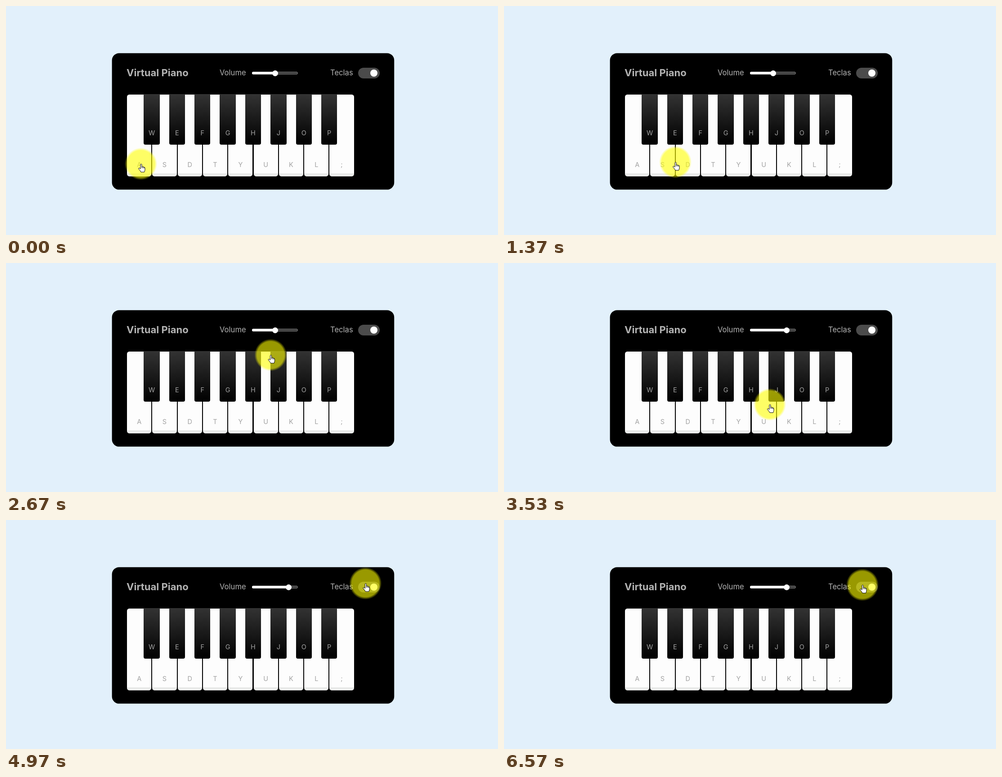
Animation of 1094x512 px, one loop 7.31 s. Source, as an HTML page:

```html
<!DOCTYPE html>
<html lang="en">
<head>
<meta charset="utf-8">
<title>Virtual Piano</title>
<style>
html, body { margin: 0; width: 100%; height: 100%; overflow: hidden; background: #e2f0fb; }
body { position: relative; font: 16.6px Inter, sans-serif; color: #b4b4b4; }
body * { position: absolute; box-sizing: border-box; }
.card { left: 0; top: 0; }
.head { top: 134px; line-height: 31px; white-space: nowrap; }
.title { left: 268px; font-size: 22px; font-weight: 700; }
.track { left: 547px; top: 147px; width: 102px; height: 6px; border-radius: 3px; background: #3b3b3b; border: 1px solid #858585; }
.fill { left: 547px; top: 147px; height: 6px; border-radius: 3px; background: #fff; }
.thumb { top: 143.5px; width: 13px; height: 13px; margin-left: -6.5px; border-radius: 50%; background: #fff; }
.toggle { left: 783px; top: 137.5px; width: 48px; height: 24px; border-radius: 12px; background: #4b4b4b; }
.knob { top: 4px; width: 16px; height: 16px; border-radius: 50%; }
.key { text-align: center; font-size: 14.5px; color: #a2a2a2; }
.key span { left: 0; width: 100%; line-height: 20px; }
.white { top: 197px; width: 56.3px; height: 185px; border: 1px solid #000; border-radius: 6.4px; background: linear-gradient(#fdfdfd 96%, #eaebea 96%); }
.white span { bottom: 16px; }
.black { top: 197px; width: 35.4px; height: 113px; border-radius: 0 0 4px 4px; background: linear-gradient(#333, #000); }
.black span { bottom: 16.5px; }
.white.active { background: linear-gradient(#fff, #f6f6f6); box-shadow: inset -4px 4px 16px rgba(0, 0, 0, .27); }
.black.active { background: linear-gradient(#000, #434343); box-shadow: inset -4px -8px 8px rgba(255, 255, 255, .1); }
.hidden span { display: none; }
#pointer { left: 0; top: 0; }
.glow { left: -36px; top: -36px; width: 72px; height: 72px; background: radial-gradient(closest-side, rgba(255, 255, 0, .6) 84%, rgba(255, 255, 0, 0)); }
#pointer svg { left: 0; top: 0; overflow: visible; fill: #fff; stroke: #000; stroke-linejoin: round; }
</style>
</head>
<body>
<svg class="card" width="1094" height="512"><rect x="235.6" y="105.4" width="627.6" height="305.2" rx="16"/></svg>
<div class="head title">Virtual Piano</div>
<div class="head" style="left:475px">Volume</div>
<div class="track"></div><div class="fill" id="fill"></div><div class="thumb" id="thumb"></div>
<div class="head" style="left:721px">Teclas</div>
<div class="toggle"><div class="knob" id="knob"></div></div>
<div id="keys"></div>
<div id="pointer">
  <div class="glow"></div>
  <svg width="1" height="1">
    <path id="hand" d="M-1 1.7Q-1 .3 .5 .3T2 1.7V6Q4 5.2 4.7 6.7Q6.5 6 7.2 7.5Q9 7.2 9 9.5V13Q9 15 7.5 18.3H0Q-1 15.5-5 11.3Q-5.8 9.6-4.2 9.1Q-3 9-1 11.2ZM2 6v3.5M4.7 6.7v3M7.2 7.5v2.5"/>
    <path id="arrow" d="M.5 .5V16l3.6-3.4 2.4 5.4 2.2-1-2.4-5.3H11Z"/>
  </svg>
</div>
<script>
const LOOP = 7310;
const $ = id => document.getElementById(id);

// time, x, y of the pointer tip
const path = [
  [0, 300, 353], [420, 300, 353], [560, 342, 357], [700, 378, 351], [870, 378, 351],
  [1080, 390, 355], [1370, 381, 349], [1570, 381, 349], [1800, 395, 339], [2070, 414, 321],
  [2220, 441, 293], [2330, 433, 299], [2470, 433, 299], [2670, 588, 206], [2900, 630, 150],
  [3220, 630, 150], [3530, 591, 316], [3800, 590, 340], [3900, 590, 340], [4130, 606, 339],
  [4430, 606, 339], [4970, 799, 142], [5100, 802, 138], [5200, 797, 145], [LOOP, 797, 145]
];
const presses = { A: 330, S: 870, D: 2010, F: 2470, U: 3870 };
const PRESS = 150, VOLUME_CLICK = 3100, HIDE = 5470, SHOW = 6270, SLIDE = 300;

const keys = {};
function addKey(kind, letter, x) {
  const key = document.createElement('div');
  key.className = 'key ' + kind;
  key.style.left = x + 'px';
  key.innerHTML = `<span>${letter}</span>`;
  $('keys').append(key);
  keys[letter] = key;
}
[...'ASDTYUKL;'].forEach((c, i) => addKey('white', c, 268 + 56.3 * i));
[...'WEFGHJOP'].forEach((c, i) => addKey('black', c, 306.4 + 56.35 * i));

// Hermite curve through the path, standing still at the rests
function pointerAt(t) {
  let i = 0;
  while (i < path.length - 2 && path[i + 1][0] <= t) i++;
  const rests = (a, b) => !a || !b || (a[1] === b[1] && a[2] === b[2]);
  const slope = (j, k) => {
    const a = path[j - 1], p = path[j], b = path[j + 1];
    return rests(a, p) || rests(p, b) ? 0 : (b[k] - a[k]) / (b[0] - a[0]);
  };
  const a = path[i], b = path[i + 1], d = b[0] - a[0], u = (t - a[0]) / d, v = 1 - u;
  return [1, 2].map(k =>
    a[k] * v * v * (1 + 2 * u) + b[k] * u * u * (3 - 2 * u) +
    d * u * v * (v * slope(i, k) - u * slope(i + 1, k)));
}

// CSS "ease" timing
function ease(x) {
  if (x <= 0 || x >= 1) return x <= 0 ? 0 : 1;
  let lo = 0, hi = 1, s;
  for (let n = 0; n < 20; n++) {
    s = (lo + hi) / 2;
    if (0.75 * s * (1 - s) + s ** 3 < x) lo = s; else hi = s;
  }
  return 0.3 * s * (1 - s) ** 2 + 3 * s * s * (1 - s) + s ** 3;
}

function draw(t) {
  for (const c in presses) {
    keys[c].classList.toggle('active', t >= presses[c] && t < presses[c] + PRESS);
  }
  $('keys').className = t >= HIDE && t < SHOW ? 'hidden' : '';

  const volume = t < VOLUME_CLICK ? 598 : 628;
  $('thumb').style.left = volume + 'px';
  $('fill').style.width = volume - 547 + 'px';

  const on = 1 - ease((t - HIDE) / SLIDE) + ease((t - SHOW) / SLIDE);
  const shade = 140 + 115 * on;
  $('knob').style.left = 4 + 23 * on + 'px';
  $('knob').style.background = `rgb(${shade},${shade},${shade})`;

  const [x, y] = pointerAt(t);
  const onKeys = y > 198 && y < 382 && x < 775;
  const onToggle = x > 783 && x < 831 && y > 137 && y < 162;
  $('pointer').style.transform = `translate(${x}px,${y}px)`;
  $('hand').style.display = onKeys || onToggle ? '' : 'none';
  $('arrow').style.display = onKeys || onToggle ? 'none' : '';
}

const start = performance.now();
function tick() {
  draw((performance.now() - start) % LOOP);
  requestAnimationFrame(tick);
}
tick();
</script>
</body>
</html>
```
